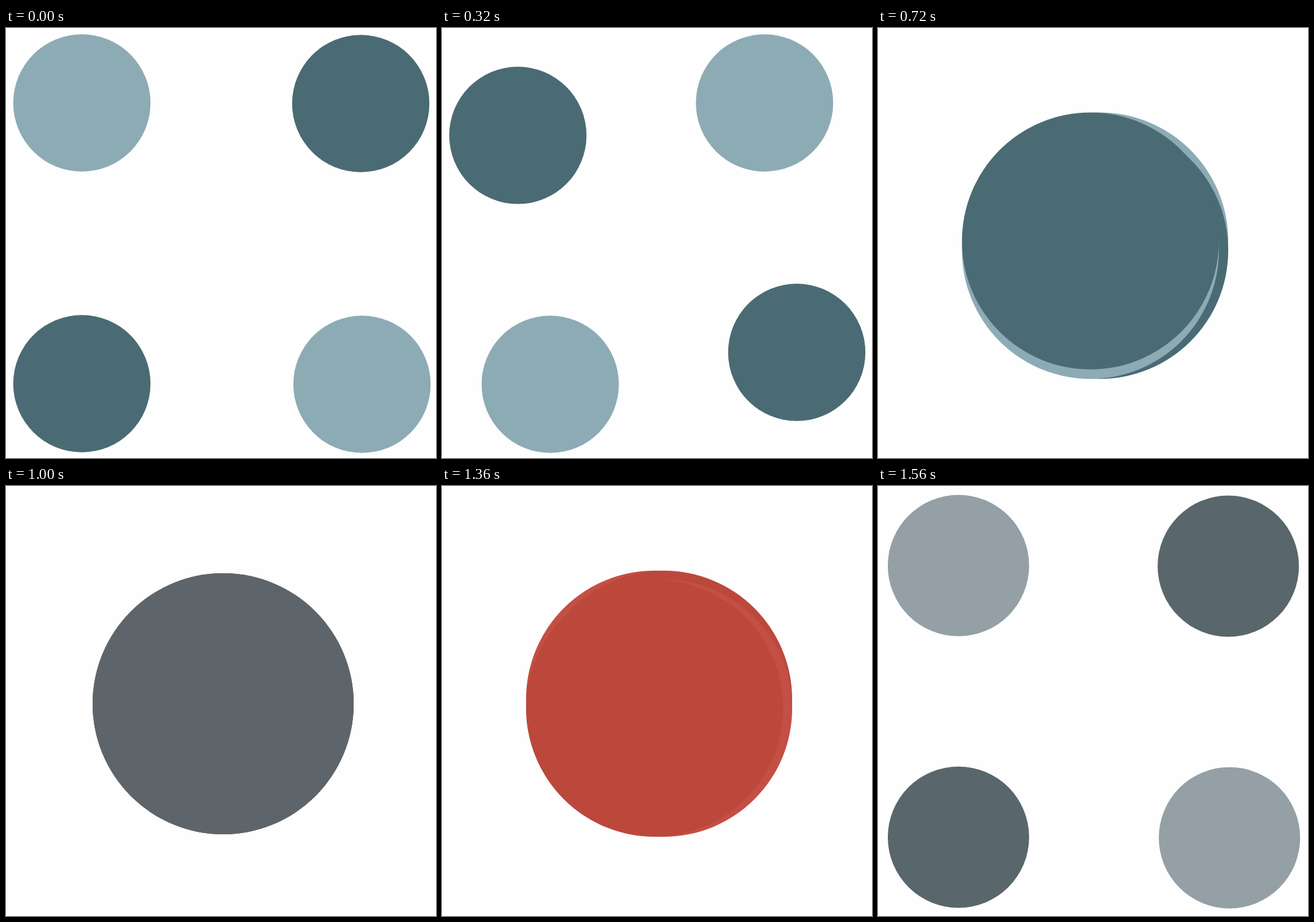
Write an HTML page that moves like this. It is 700 by 700 pixels and loops after 1.6 s.

```html
<!DOCTYPE html>
<html lang="en">
<head>
<meta charset="utf-8">
<title>Four circles</title>
<style>
  html, body { margin: 0; width: 100%; height: 100%; overflow: hidden; background: #fefefe; }
  svg { display: block; width: 100%; height: 100%; }
</style>
</head>
<body>
<svg id="stage" viewBox="0 0 700 700"></svg>
<script>
const LOOP = 1600, STEP = 40;
const SMALL = 111.75, LARGE = 212.5;
const CENTER = [353.5, 354.5];
const DARK = [74, 107, 115], LIGHT = [141, 171, 181], RED = [203, 67, 53];

// Each circle slides along one side, from its home corner to the next.
const circles = [
  { home: [123.5, 122], next: [577.5, 122], color: LIGHT },
  { home: [577.5, 123], next: [577.5, 581], color: DARK },
  { home: [579.5, 580], next: [123.5, 580], color: LIGHT },
  { home: [123.5, 579], next: [123.5, 122], color: DARK }
];

const stage = document.getElementById("stage");
for (const c of circles) {
  c.node = document.createElementNS("http://www.w3.org/2000/svg", "circle");
  stage.appendChild(c.node);
}

const progress = (t, start, length) => Math.min(1, Math.max(0, (t - start) / length));
const ease = u => (1 - Math.cos(Math.PI * u)) / 2;
const lerp = (a, b, p) => a + (b - a) * p;
const mix = (a, b, p) => a.map((v, i) => lerp(v, b[i], p));

function draw(t) {
  const slide = ease(progress(t, 140, 231));
  const merge = ease(progress(t, 517, 230));
  const redden = progress(t, 981, 130);
  const split = progress(t, 1330, 260);
  const out = ease(split);

  for (const c of circles) {
    const corner = mix(c.home, c.next, slide);
    const [x, y] = mix(mix(corner, CENTER, merge), c.home, out);
    const color = mix(mix(c.color, RED, redden), c.color, split);
    c.node.setAttribute("cx", x);
    c.node.setAttribute("cy", y);
    c.node.setAttribute("r", lerp(lerp(SMALL, LARGE, merge), SMALL, out));
    c.node.setAttribute("fill", `rgb(${color.map(Math.round)})`);
  }
}

const begin = performance.now();
function tick() {
  const t = (performance.now() - begin) % LOOP;
  draw(Math.floor(t / STEP) * STEP);
  requestAnimationFrame(tick);
}
tick();
</script>
</body>
</html>
```
